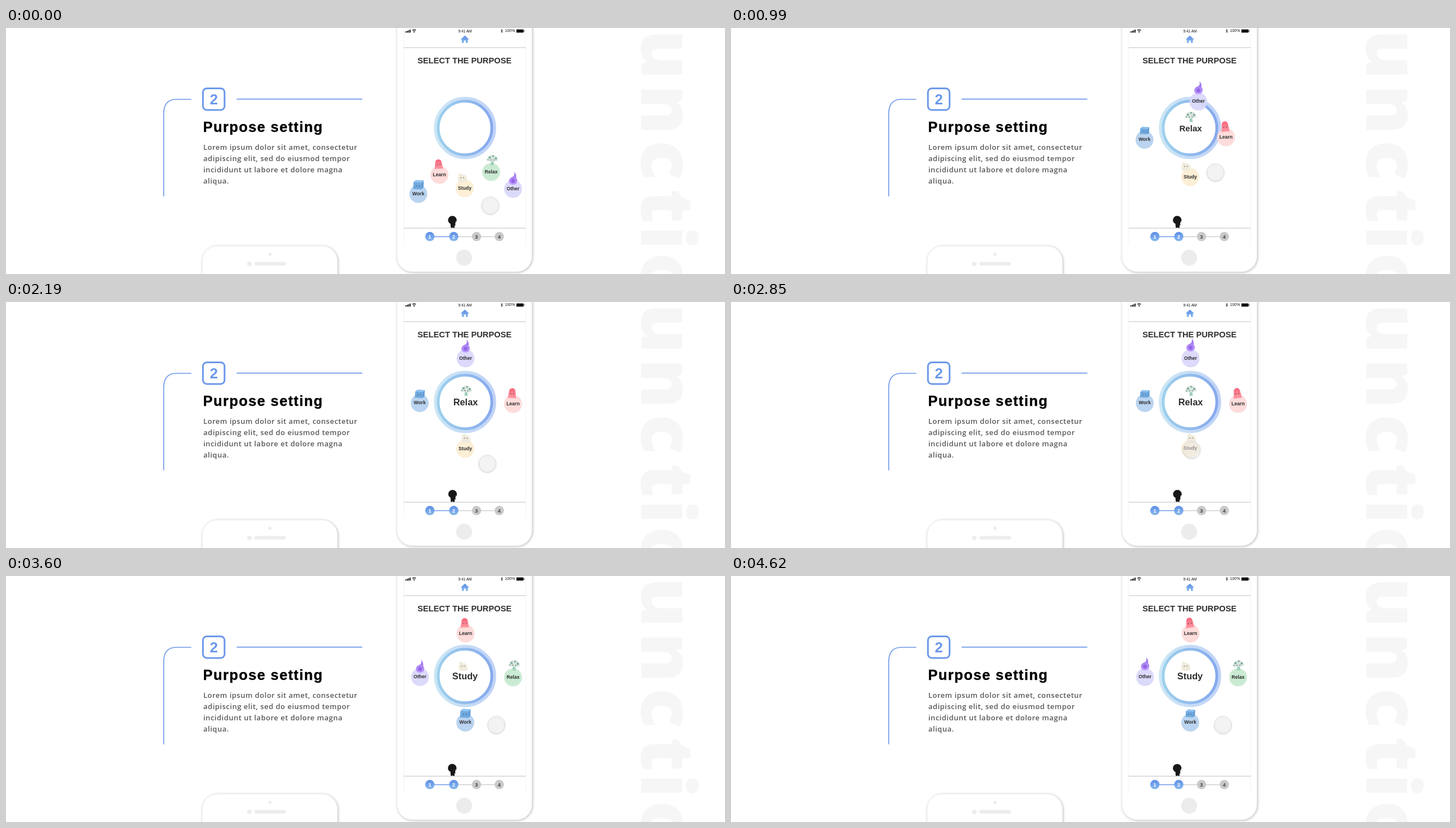
These frames come from a looping animation (1279x438 px, 4.65 s). An HTML page:

```html
<!DOCTYPE html>
<html lang="en">
<head>
<meta charset="utf-8">
<title>Purpose setting</title>
<style>
html, body { margin: 0; width: 100%; height: 100%; overflow: hidden; background: #fff; }
svg { display: block; width: 100%; height: 100%; font-family: "Liberation Sans", Arial, sans-serif; }
.bold { font-weight: bold; }
.mid { text-anchor: middle; }
.copy { font: 600 13px "Open Sans", sans-serif; letter-spacing: .5px; fill: #585858; }
.phone { fill: #fff; stroke: #ececec; filter: drop-shadow(1.5px 1.5px 2px #0004); }
.accent { fill: none; stroke: #6c98ea; stroke-width: 1.7; stroke-linecap: round; }
</style>
</head>
<body>
<svg viewBox="0 0 1279 438">
  <defs>
    <linearGradient id="ring"><stop stop-color="#9dd0ec"/><stop offset="1" stop-color="#86a9ee"/></linearGradient>
    <linearGradient id="blue" x2="0" y2="1"><stop stop-color="#5f8fe6"/><stop offset="1" stop-color="#86b8ee"/></linearGradient>
    <linearGradient id="crayon" x2="0" y2="1"><stop stop-color="#f9657b"/><stop offset="1" stop-color="#ff98a2"/></linearGradient>
    <linearGradient id="flame" x2="0" y2="1"><stop stop-color="#9a72ee"/><stop offset="1" stop-color="#c09bff"/></linearGradient>
  </defs>

  <text transform="translate(1130 0) rotate(90)" x="3 101 200 287 352 400" fill="#f6f6f6"
    style="font: 800 132px 'Open Sans', sans-serif">unctio</text>

  <!-- description -->
  <path class="accent" d="M329 127H303Q280.5 127 280.5 153V299M411 126.700H633"/>
  <rect x="350.300" y="107.500" width="38.500" height="38.500" rx="7" class="accent" style="stroke-width:3"/>
  <text x="369.800" y="136" class="bold mid" font-size="26" fill="#6c98ea">2</text>
  <text x="350.500" y="184.500" class="bold" font-size="25.500" letter-spacing="1.400"
    stroke="#000" stroke-width=".4" stroke-linejoin="round">Purpose setting</text>
  <g class="copy">
    <text x="351" y="217">Lorem ipsum dolor sit amet, consectetur</text>
    <text x="351" y="237">adipiscing elit, sed do eiusmod tempor</text>
    <text x="351" y="257">incididunt ut labore et dolore magna</text>
    <text x="351" y="277">aliqua.</text>
  </g>

  <!-- lower phone -->
  <rect class="phone" x="349" y="388" width="240.500" height="120" rx="27"/>
  <g fill="#ededed">
    <circle cx="469.500" cy="403" r="3"/><circle cx="433" cy="420" r="4"/>
    <rect x="442" y="416.500" width="56" height="6.500" rx="3.200"/>
  </g>

  <!-- main phone -->
  <rect class="phone" x="695.500" y="-60" width="240" height="494" rx="27"/>
  <path d="M707.500 0V386M924.500 0V386" stroke="#f4f4f4"/>
  <path d="M707 34.800H925M707 356.500H925" stroke="#dcdcdc" stroke-width="1.800"/>
  <circle cx="815" cy="409" r="14.200" fill="#ececec"/>
  <g fill="#111">
    <path d="M710.500 6h1.700v2.300h-1.700zM713 5h1.700v3.300H713zM715.500 4h1.700v4.300h-1.700zM718 2.700h1.700v5.600H718zM908 2.500h12.500v5.800H908zM921 4.200h1.200v2.400H921z"/>
    <path d="M722.800 4.200Q726 1.600 729.200 4.200M724.300 6Q726 4.600 727.700 6" fill="none" stroke="#111" stroke-width="1.100"/>
    <circle cx="726" cy="7.600" r=".9"/>
    <path d="M880.300 3.700l3.200 3-1.600 1.600V2.300l1.600 1.600-3.200 3" fill="none" stroke="#111" stroke-width=".7"/>
    <text x="816.500" y="7.700" class="mid" font-size="6.600">9:41 AM</text>
    <text x="896.500" y="7.300" class="mid" font-size="6.800">100%</text>
  </g>
  <path d="M816.300 13.500l7.700 7h-2.300v6h-3.800v-4.300h-3.200v4.300h-3.800v-6h-2.300z" fill="url(#blue)"/>
  <text x="815.600" y="63.200" class="bold mid" font-size="14.700" fill="#303030">SELECT THE PURPOSE</text>
  <g fill="none" stroke="url(#ring)">
    <circle cx="816.500" cy="178" r="52.600" stroke-width="5.600" opacity=".52"/>
    <circle cx="816.500" cy="178" r="47.700" stroke-width="5"/>
  </g>
  <path d="M796 371.500H878" stroke="#cfcfcf" stroke-width="1.700"/>
  <path d="M754 371.500H796" stroke="#6c98ea" stroke-width="1.700"/>
  <g id="steps" class="bold mid" font-size="9.500"></g>
  <g id="mascot" fill="#171717">
    <ellipse cx="794" cy="342" rx="7.700" ry="7.400"/>
    <path d="M791 346h8.500q-1 3 .3 5.200l-2 .6.300 4h-3l-.6-1.200-.4 1.200h-2.800q-.9-5-.3-9.800z"/>
    <circle cx="800" cy="345.500" r="1" fill="#aaa"/>
  </g>
  <g id="items"></g>
  <circle id="cursor" r="15.300" fill="#fff" fill-opacity=".48" stroke="#dedede" stroke-width="1"
    style="filter: drop-shadow(0 1px 1px #0003)"/>
</svg>

<script>
const LOOP = 4650, TAU = Math.PI * 2;
const $ = id => document.getElementById(id);
const lerp = (a, b, p) => a + (b - a) * p;
const ease = x => {
  x = Math.min(1, Math.max(0, x));
  return x < .5 ? 2 * x * x : 1 - 2 * (1 - x) ** 2;
};

// Eyes at the given centre and half distance
const eyes = (x, y, d) => `<g fill="#444"><circle cx="${x - d}" cy="${y}" r=".8"/><circle cx="${x + d}" cy="${y}" r=".8"/></g>`;

// spots: resting place before, between and after the two moves; centre: which of them is in the ring
const items = [
  { name: 'Work', fill: '#b7d3f2', spots: [[733.5, 295], [736, 179.5], [817, 260.5]],
    art: `<path d="M-8-5L-4-8 9.500-7 9 5 5 8-9 7z" fill="#5f9cd6"/><path d="M-8.500-4L-4-8 9.500-7 6-3z" fill="#91c4f1"/><path d="M-8.500-4L6-3 5 8-9 7z" fill="#6fa9de"/>` + eyes(-1, 2, 2.5),
    pose: c => `translate(0 -16) scale(${.95 + .06 * c} ${.92 + .1 * c})` },
  { name: 'Learn', fill: '#ffdcdb', spots: [[771, 261], [902, 181], [817.5, 102]],
    art: `<path d="M-7.500 8.500L-5.500-5Q-4-9 0-9 4-9 5.300-5L7.500 8.500z" fill="url(#crayon)"/>` + eyes(0, 1, 2.5),
    pose: (c, s) => `translate(-1.500 -18.500) rotate(${6 * s - 3}) scale(1 ${1 - .05 * c})` },
  { name: 'Study', fill: '#fff0d6', spots: [[816, 285], [817, 261], [816.5, 179]], centre: 2,
    art: `<path d="M-7 7Q-9 0-6-3-8-7-4-8-1-8 0-5 6-6 8 0 9 7 6 8-2 9-7 7z" fill="#f0ebdc"/>` + eyes(0, 0, 2.3),
    pose: (c, s, t) => `translate(${-3 + 5 * Math.cos(TAU * (t - 2600) / 3700)} -18.500)` },
  { name: 'Relax', fill: '#c9ecd2', spots: [[863, 256], [817.5, 179], [902, 180]], centre: 1,
    art: `<path d="M-2 0H2L3 9H-3z" fill="#9ed0b8"/><path d="M-10 1Q-9-9 0-9 9-9 10 1 0 5-10 1z" fill="#d9e6df"/>
      <g fill="#7dab98"><circle cx="-5" cy="-4" r="2"/><circle cx="1" cy="-7" r="1.600"/><circle cx="6" cy="-3" r="2"/><circle cx="-8" cy="0" r="1.200"/></g>` + eyes(0, 0, 2.5),
    pose: (c, s) => `translate(${1.3 + c} -21) rotate(${2 * c + 3 * s})` },
  { name: 'Other', fill: '#dcdafd', spots: [[902, 286], [817.5, 100], [736.5, 179.5]],
    art: `<path d="M2-16Q7-9 5.500-5 8-2 7.500 2 6 7.500 0 7.500-6 7.500-7.500 2-7.500-4-2-6 4-8 2-16z" fill="url(#flame)"/><circle cy="1" r="3" fill="#a57af5" stroke="#7d50d4"/><circle cy="1" r="1" fill="#6b43bd"/>`,
    pose: c => `translate(0 ${-17.5 + 3 * c})` }
];

$('items').innerHTML = items.map(i => `<g>
  <circle r="15.800" cy=".5" fill="${i.fill}" fill-opacity=".93" style="filter: drop-shadow(0 .6px .5px #0002)"/>
  <g>${i.art}</g>
  <text class="bold mid" font-size="8.600" y="2.600" fill="#2d2d2d">${i.name}</text></g>`).join('');
items.forEach((item, n) => {
  item.node = $('items').children[n];
  [item.bubble, item.icon, item.label] = item.node.children;
});

$('steps').innerHTML = [754, 796.5, 837, 877.5].map((x, n) => `
  <circle cx="${x}" cy="371.300" r="8.300" fill="${n < 2 ? 'url(#blue)' : '#c9c9c9'}"/>
  <text x="${x}" y="374.700" fill="${n < 2 ? '#fff' : '#444'}">${n + 1}</text>`).join('');

const moves = [675, 2850];   // start of each rearrangement
const track = [              // cursor: time, x, y
  [0, 861.5, 316], [690, 860, 255], [900, 862, 255.5], [1500, 857.5, 288.5], [2100, 857.5, 288.5],
  [2800, 819.5, 263], [2950, 819.5, 263], [3550, 872.3, 265], [LOOP, 875, 265]
];

function placeItem(item, t) {
  const second = t >= moves[1] - 20;
  const from = second ? 1 : 0, to = from + 1;
  const start = moves[from], [a, b] = [item.spots[from], item.spots[to]];
  const p = ease((t - start) / 443);
  const q = item.centre === to ? ease((t - start + 14) / 339) : p;
  const focus = item.centre === to ? p : item.centre === from ? 1 - p : 0;
  const angle = TAU * t / 1740;
  item.node.setAttribute('transform', `translate(${lerp(a[0], b[0], q)} ${lerp(a[1], b[1], q)})`);
  item.bubble.setAttribute('opacity', Math.max(0, 1 - focus * 1.25));
  item.label.setAttribute('transform', `scale(${1 + .9 * focus})`);
  item.icon.setAttribute('transform', item.pose(Math.cos(angle), Math.sin(angle), t));
}

function placeCursor(t) {
  const n = track.findIndex(k => k[0] > t);
  const a = track[n - 1], b = track[n];
  const p = ease((t - a[0]) / (b[0] - a[0]));
  $('cursor').setAttribute('transform', `translate(${lerp(a[1], b[1], p)} ${lerp(a[2], b[2], p)})`);
}

function draw() {
  const t = performance.now() % LOOP;
  items.forEach(item => placeItem(item, t));
  placeCursor(t);
  $('mascot').setAttribute('transform', `rotate(${2 * Math.sin(TAU * t / 520)} 795 356)`);
  requestAnimationFrame(draw);
}
draw();
</script>
</body>
</html>
```
